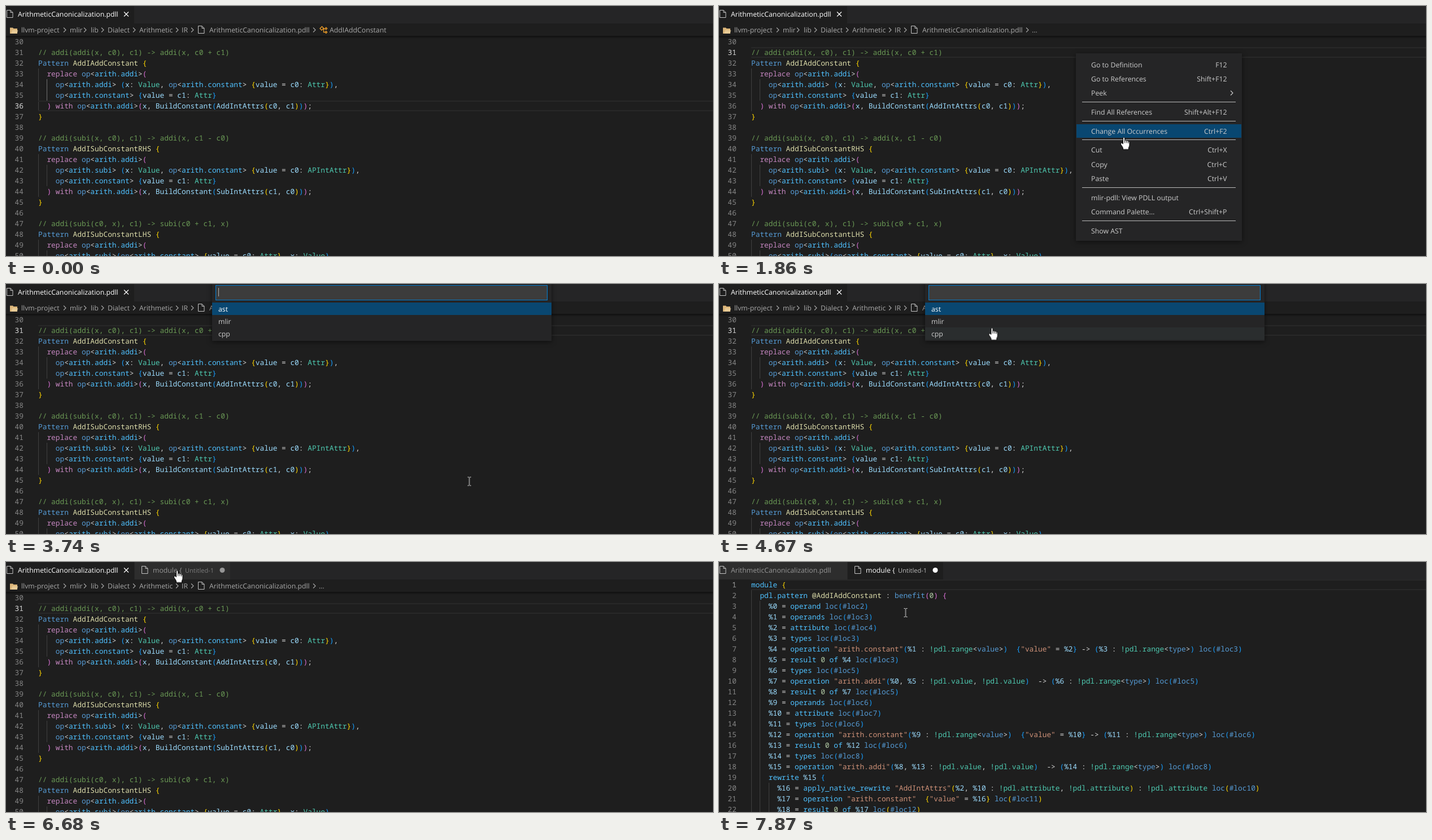
Write an HTML page that moves like this. It is 1252x444 px and loops after 8000 ms.

```html
<!DOCTYPE html>
<html lang="en">
<head>
<meta charset="utf-8">
<title>Editor walkthrough</title>
<style>
  html, body { margin: 0; width: 100%; height: 100%; overflow: hidden; background: #1e1e1e; }
  svg { display: block; width: 1252px; height: 444px; }
  text { font: 12.28px "Open Sans", "Noto Sans", sans-serif; text-rendering: geometricPrecision; white-space: pre; }
  .code text { font: 12.83px "Noto Sans Mono", "DejaVu Sans Mono", monospace; }
  .small { font-size: 11.05px; }
  .line { fill: none; stroke-width: 1; }
  #menu, #picker { filter: drop-shadow(0 2px 4px rgba(0, 0, 0, .5)); }
</style>
</head>
<body>
<script>
const LOOP = 8000;
const CHAR = 7.697, LINE = 19, CODE_X = 57;

// ---- drawing helpers ----
const esc = s => s.replace(/&/g, '&amp;').replace(/</g, '&lt;');
const text = (x, y, s, fill, attrs = '') => `<text x="${x}" y="${y}" fill="${fill}" ${attrs}>${esc(s)}</text>`;
const rect = (x, y, w, h, fill, attrs = '') =>
  `<rect x="${x}" y="${y}" width="${w}" height="${h}" fill="${fill}" ${attrs}/>`;
const path = (d, stroke, attrs = '') => `<path class="line" d="${d}" stroke="${stroke}" ${attrs}/>`;
const group = (id, body, attrs = '') => `<g id="${id}" ${attrs}>${body}</g>`;
const chevron = (x, y, color = '#a9a9a9') => path(`M${x - 2} ${y - 4}l4 4l-4 4`, color, 'style="stroke-width:1.1"');
const fileIcon = (x, y, color) => path(`M${x + .5} ${y + .5}h6.5l4 4v9h-10.5zM${x + 7} ${y + .5}v4h4`, color);

// ---- syntax colouring ----
const BRACKETS = ['#ffd700', '#da70d6', '#179fff'];

const PDLL = [
  [/\/\/.*/, '#6a9955'],
  [/\b(?:Pattern|op)\b/, '#569cd6'],
  [/\b(?:replace|with)\b/, '#c586c0'],
  [/\b(?:APIntAttr|Attr|Value)\b/, '#4ec9b0'],
  [/AddI\w*Constant\w*/, '#dcdcaa'],
  [/arith\.\w+/, '#4fc1ff'],
  [/\w+/, '#9cdcfe'],
];

const MLIR = [
  [/"[^"]*"/, '#ce9178'],
  [/%\d+/, '#9cdcfe'],
  [/@\w+/, '#dcdcaa'],
  [/!pdl\.\w+/, '#4ec9b0'],
  [/#loc\d+|\bloc\b|\bbenefit\b|(?<=<)\w+/, '#569cd6'],
  [/\b\d+\b/, '#b5cea8'],
  [/[a-z][\w.]*/, '#4fc1ff'],
];

const lineNumber = (n, y, fill) => text(31, y + 14, String(n), fill, 'text-anchor="end"');

function codeView(source, rules, first, top) {
  const scanner = new RegExp(rules.map(r => `(${r[0].source})`).join('|') + '|([(){}])|(\\S)', 'g');
  let depth = 0;
  return source.map((line, row) => {
    const y = top + row * LINE;
    let out = lineNumber(first + row, y, '#858585');
    for (let col = 0; col < line.search(/\S/); col += 2)
      out += rect(Math.round(CODE_X + col * CHAR), y, 1, LINE, '#404040');
    let spans = '';
    for (const m of line.matchAll(scanner)) {
      const kind = m.slice(1).findIndex(g => g !== undefined);
      let color = '#d4d4d4';
      if (kind < rules.length) color = rules[kind][1];
      else if (kind === rules.length)
        color = BRACKETS[('({'.includes(m[0]) ? depth++ : --depth) % 3];
      spans += `<tspan x="${(CODE_X + m.index * CHAR).toFixed(2)}" fill="${color}">${esc(m[0])}</tspan>`;
    }
    return out + `<text y="${y + 14}">${spans}</text>`;
  }).join('');
}

const activeLine = (n, y) =>
  rect(CODE_X, y, 1200, 2, '#282828') + rect(CODE_X, y + LINE - 2, 1200, 2, '#282828') + lineNumber(n, y, '#c6c6c6');

const pattern = (note, name, lhs, sum) => [
  `// ${note}`,
  `Pattern ${name} {`,
  '  replace op<arith.addi>(',
  `    ${lhs},`,
  '    op<arith.constant> {value = c1: Attr}',
  `  ) with op<arith.addi>(x, BuildConstant(${sum}));`,
  '}', ''];

const pdllSource = ['',
  ...pattern('addi(addi(x, c0), c1) -> addi(x, c0 + c1)', 'AddIAddConstant',
    'op<arith.addi> (x: Value, op<arith.constant> {value = c0: Attr})', 'AddIntAttrs(c0, c1)'),
  ...pattern('addi(subi(x, c0), c1) -> addi(x, c1 - c0)', 'AddISubConstantRHS',
    'op<arith.subi> (x: Value, op<arith.constant> {value = c0: APIntAttr})', 'SubIntAttrs(c1, c0)'),
  ...pattern('addi(subi(c0, x), c1) -> subi(c0 + c1, x)', 'AddISubConstantLHS',
    'op<arith.subi>(op<arith.constant> {value = c0: Attr}, x: Value)', '').slice(0, 4)];

const mlirSource = `module {
  pdl.pattern @AddIAddConstant : benefit(0) {
    %0 = operand loc(#loc2)
    %1 = operands loc(#loc3)
    %2 = attribute loc(#loc4)
    %3 = types loc(#loc3)
    %4 = operation "arith.constant"(%1 : !pdl.range<value>)  {"value" = %2} -> (%3 : !pdl.range<type>) loc(#loc3)
    %5 = result 0 of %4 loc(#loc3)
    %6 = types loc(#loc5)
    %7 = operation "arith.addi"(%0, %5 : !pdl.value, !pdl.value)  -> (%6 : !pdl.range<type>) loc(#loc5)
    %8 = result 0 of %7 loc(#loc5)
    %9 = operands loc(#loc6)
    %10 = attribute loc(#loc7)
    %11 = types loc(#loc6)
    %12 = operation "arith.constant"(%9 : !pdl.range<value>)  {"value" = %10} -> (%11 : !pdl.range<type>) loc(#loc6)
    %13 = result 0 of %12 loc(#loc6)
    %14 = types loc(#loc8)
    %15 = operation "arith.addi"(%8, %13 : !pdl.value, !pdl.value)  -> (%14 : !pdl.range<type>) loc(#loc8)
    rewrite %15 {
      %16 = apply_native_rewrite "AddIntAttrs"(%2, %10 : !pdl.attribute, !pdl.attribute) : !pdl.attribute loc(#loc10)
      %17 = operation "arith.constant"  {"value" = %16} loc(#loc11)
      %18 = result 0 of %17 loc(#loc12)`.split('\n');

// ---- interface parts ----
const FILE = 'ArithmeticCanonicalization.pdll';

const fileTab = (bg, fg) => rect(0, 0, 227, 31, bg) + fileIcon(1, 7, '#c5c5c5') + text(21, 19, FILE, fg);
const outputTab = (bg, fg, dim) => rect(228, 0, 169, 31, bg) + fileIcon(240, 7, '#c5c5c5') +
  text(260, 19, 'module {', fg) + text(317, 19, 'Untitled-1', dim, 'class="small"') +
  `<circle cx="383" cy="14.5" r="4.5" fill="${fg}"/>`;

const crumbs = [[27, 'llvm-project'], [113, 'mlir'], [150, 'lib'], [180, 'Dialect'], [236, 'Arithmetic'], [311, 'IR'], [360, FILE]];
const breadcrumbs =
  '<path d="M7 38.5h5l1.5 1.5h6.5v9h-13z" fill="#dcb67a"/><path d="M9 49l2.5-6h10l-2 6z" fill="#f0d9a8" opacity=".6"/>' +
  crumbs.map(([x, s]) => text(x, 47, s, '#a9a9a9')).join('') +
  [104, 140, 171, 227, 303, 330, 546].map(x => chevron(x, 42.5)).join('') +
  fileIcon(340, 35, '#c5c5c5') +
  group('symbol', path('M556 40l3.500-3.500l3 3l-3.500 3.500zM561 40.500h3.500M562.500 40.500v6h2M565 40l1.800-1.800l1.800 1.800l-1.800 1.800zM565 46.500l1.800-1.800l1.800 1.800l-1.800 1.800z',
    '#ee9d28', 'style="stroke-width:1.3"') + text(573, 47, 'AddIAddConstant', '#a9a9a9')) +
  group('ellipsis', text(554, 47, '…', '#a9a9a9'));

const menuItems = [
  [104, 'Go to Definition', 'F12'], [129, 'Go to References', 'Shift+F12'], [154, 'Peek', ''],
  [188, 'Find All References', 'Shift+Alt+F12'], [222, 'Change All Occurrences', 'Ctrl+F2'],
  [255.5, 'Cut', 'Ctrl+X'], [281, 'Copy', 'Ctrl+C'], [306, 'Paste', 'Ctrl+V'],
  [340, 'mlir-pdll: View PDLL output', ''], [365, 'Command Palette…', 'Ctrl+Shift+P'], [399, 'Show AST', '']];
const menu = rect(632, 84, 294, 333, '#252526') +
  menuItems.map(([y, label, keys], i) => rect(633, y - 12, 292, 24, '#094771', `id="item${i}"`) +
    text(659, y + 4.5, label, '#cccccc') + text(899.5, y + 4.5, keys, '#cccccc', 'text-anchor="end"')).join('') +
  [170, 204, 237, 322, 381].map(y => rect(643, y, 272, 1, '#bbbbbb')).join('') + chevron(908, 154.5, '#cccccc');

const pickerRows = [[44, 'ast'], [66, 'mlir'], [88, 'cpp']];
const picker = rect(365, -6, 601, 107, '#252526') +
  rect(371.5, 2.5, 587, 26, '#3c3c3c', 'stroke="#007fd4"') + rect(365, 33, 601, 22, '#094771') +
  pickerRows.map(([y, label], i) => (i ? rect(365, y - 11, 601, 22, '#2a2d2e', `id="row${i}"`) : '') +
    text(376, y + 5, label, i ? '#cccccc' : '#ffffff')).join('') +
  rect(376, 7, 1, 15, '#aeafad', 'id="inputCaret"');

const cursors =
  group('ibeam', path('M-3-7.500h2l1 1l1-1h2M0-6.500v13M-3 7.500h2l1-1l1 1h2', '#e8e8e8')) +
  group('arrow', '<path d="M.5.7v16l3.700-3.600l2.400 5.400l2.200-1l-2.300-5.200h5z" fill="#fff" stroke="#000"/>') +
  group('hand', '<path d="M-1.500 1.500Q0-.5 1.700 1.500V6Q3.500 5 4.800 6.500Q6.500 5.600 7.700 7.300Q10 7 10 9.500V14.500Q10 16.500 8.500 18.500V22H-1.500V19.500Q-2.500 17-5 13.800Q-6.500 11.700-5 10.600Q-3.700 9.900-1.500 12z" fill="#fff" stroke="#000"/>' +
    path('M1.700 6v4.500M4.800 7v3.500M7.700 8v3', '#000'));

document.body.innerHTML = `<svg viewBox="0 0 1252 444">
  <defs><linearGradient id="shade" x2="0" y2="1"><stop stop-opacity=".45"/><stop offset="1" stop-opacity="0"/></linearGradient></defs>` +
  rect(0, 0, 1252, 444, '#1e1e1e') + rect(0, 0, 1252, 31, '#252526') +
  group('patternFile',
    fileTab('#1e1e1e', '#ffffff') + path('M209 10.500l8 8m0-8l-8 8', '#ffffff', 'style="stroke-width:1.2"') + breadcrumbs +
    `<g class="code">${codeView(pdllSource, PDLL, 30, 54)}` +
    group('line36', activeLine(36, 168) + rect(72, 130, 1, 2 * LINE, '#707070')) +
    group('line31', activeLine(31, 73)) + '</g>' + rect(0, 53, 1252, 5, 'url(#shade)')) +
  group('outputTab', outputTab('#2d2d2d', '#969696', '#7c7c7c')) +
  group('outputFile',
    fileTab('#2d2d2d', '#969696') + outputTab('#1e1e1e', '#ffffff', '#bbbbbb') +
    `<g class="code">${activeLine(1, 31)}${codeView(mlirSource, MLIR, 1, 31)}</g>` +
    rect(CODE_X, 31, 2, LINE, '#aeafad', 'id="editorCaret"')) +
  group('menu', menu) + group('picker', picker) + group('cursor', cursors) + '</svg>';

// ---- motion ----
function track(id, prop, steps) {
  const frames = steps.map(([t, value]) => ({ offset: t / LOOP, [prop]: value, easing: 'step-end' }));
  frames.push({ offset: 1, [prop]: steps[steps.length - 1][1] });
  document.getElementById(id).animate(frames, { duration: LOOP, iterations: Infinity });
}

const show = (id, from, to = LOOP) => track(id, 'opacity',
  [...(from ? [[0, 0]] : []), [from, 1], ...(to < LOOP ? [[to, 0]] : [])]);

show('line36', 0, 1070);
show('line31', 1070);
show('symbol', 0, 1400);
show('ellipsis', 1400);
track('menu', 'opacity', [[0, 0], [1130, .5], [1200, 1], [3610, 0]]);
show('picker', 3740, 5130);
track('inputCaret', 'opacity', [[0, 1], [4200, 0], [4740, 1]]);
show('outputTab', 6270, 7140);
show('patternFile', 0, 7140);
show('outputFile', 7140);
show('editorCaret', 7270, 7740);

const smooth = p => p * p * (3 - 2 * p);
const easeIn = p => p ** 1.6;
const easeOut = p => 1 - (1 - p) ** 1.6;

// The pointer moves in discrete steps; its shape depends on what lies under it.
const poses = [{ t: 0, x: 990, y: 421, shape: 'none' }];
function move(start, end, count, x, y, shapeAt, ease = smooth) {
  const from = poses[poses.length - 1];
  for (let i = 1; i <= count; i++) {
    const p = ease(i / count), py = from.y + (y - from.y) * p;
    const t = count > 1 ? start + (end - start) * (i - 1) / (count - 1) : start;
    poses.push({ t, x: from.x + (x - from.x) * p, y: py, shape: shapeAt(py) });
  }
}
const ibeam = () => 'ibeam', arrow = () => 'arrow', hand = () => 'hand';
const overEditor = y => y < 30 ? 'hand' : y < 58 ? 'arrow' : 'ibeam';

move(130, 800, 11, 634.5, 84, ibeam);
move(1200, 1200, 1, 634, 84, arrow);
move(1400, 1600, 4, 672, 122.5, hand, easeIn);
move(1670, 2130, 8, 757, 331, hand, easeOut);
move(2800, 2930, 2, 761, 335, hand);
move(3210, 3470, 4, 820, 350, hand);
move(3610, 3610, 1, 820.5, 350.5, ibeam);
move(4000, 4530, 9, 484, 78.5, y => y < 101 ? 'hand' : 'ibeam');
move(4670, 4870, 4, 480, 72, hand);
move(5200, 5200, 1, 480.5, 72.5, ibeam);
move(5600, 5870, 5, 407, 57, overEditor);
move(5940, 6340, 7, 538, 51, overEditor);
move(6410, 6680, 5, 303, 14.5, overEditor);
move(7670, 7870, 4, 330.5, 90, y => y < 31 ? 'hand' : 'ibeam');

track('cursor', 'transform', poses.map(p => [p.t, `translate(${p.x}px, ${p.y}px)`]));
for (const shape of ['ibeam', 'arrow', 'hand'])
  track(shape, 'opacity', poses.map(p => [p.t, +(p.shape === shape)]));

const hover = (id, center, half) => track(id, 'opacity',
  poses.map(p => [p.t, +(p.shape === 'hand' && Math.abs(p.y - center) < half)]));
menuItems.forEach(([y], i) => hover('item' + i, y, 12.7));
pickerRows.forEach(([y], i) => i && hover('row' + i, y, 11));
</script>
</body>
</html>
```
